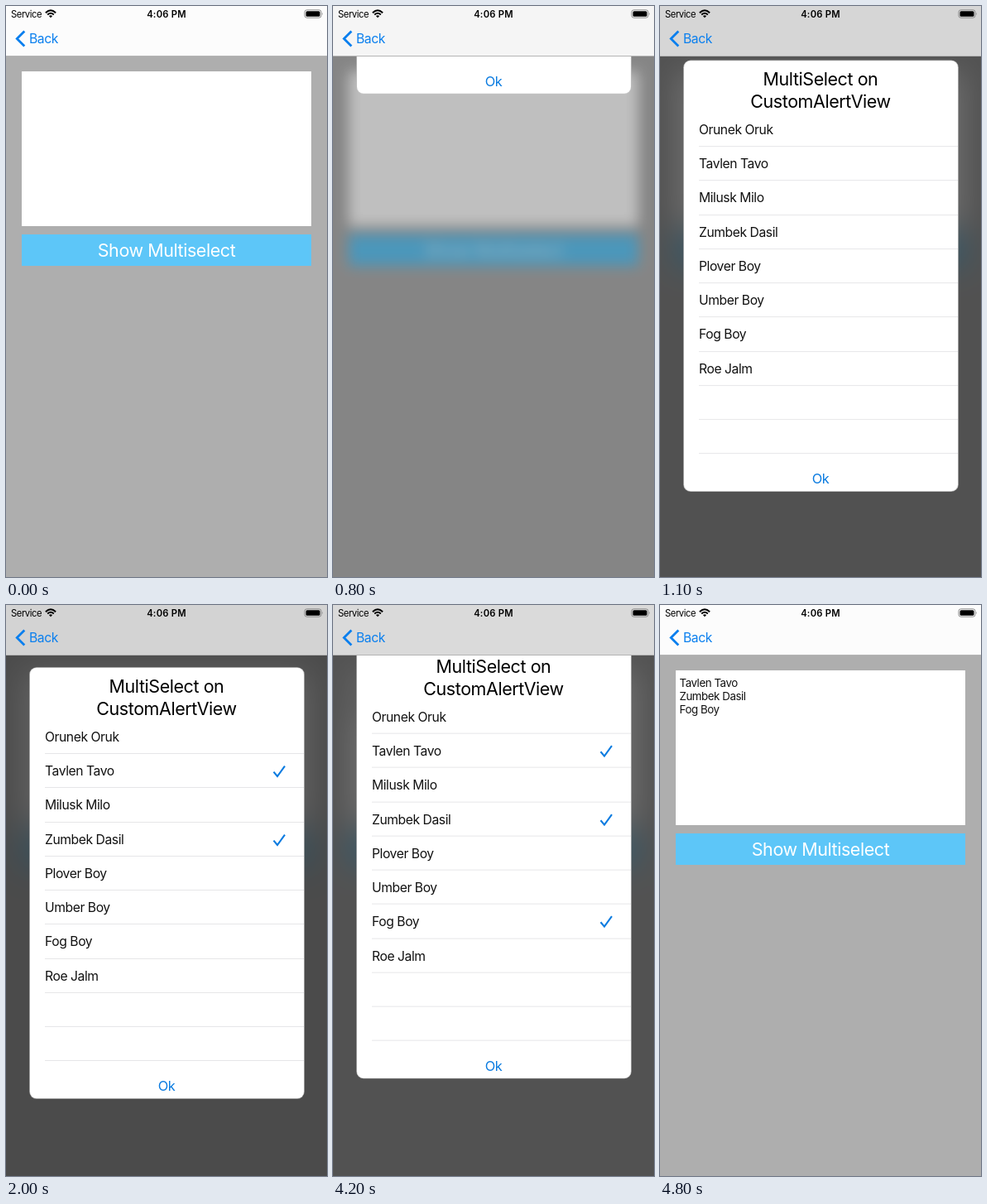
An HTML page for the animation above (4900 ms loop, 388 by 690 pixels).

```html
<!DOCTYPE html>
<html lang="en">
<head>
<meta charset="utf-8">
<style>
html, body { margin: 0; width: 100%; height: 100%; overflow: hidden; }
body { position: relative; background: #aeaeae; font: 15.7px/20px Inter, "Open Sans", sans-serif; letter-spacing: -.028em; color: #111; }
div, svg { position: absolute; white-space: nowrap; }
#stage { width: 388px; height: 690px; overflow: hidden; }
#page { inset: -80px; background: #aeaeae; }
#box { left: 99px; top: 159px; width: 350px; height: 187px; background: #fff; }
#picked { left: 4.5px; top: 7px; font-size: 13.3px; line-height: 16px; white-space: pre; }
#button { left: 99px; top: 356px; width: 350px; height: 38px; background: #5dc6f8; }
#label { width: 100%; text-align: center; font-size: 21.5px; line-height: 39px; color: #fff; }
#shade { inset: 0; background: #212121; }
#alert { left: 28.5px; top: 75.5px; width: 331px; height: 520.5px; border-radius: 8px; background: #fff; box-shadow: 0 0 0 .7px #c4c4c4; overflow: hidden; }
#title { width: 100%; top: 9.5px; text-align: center; font-size: 21.5px; line-height: 26.5px; color: #000; }
.row { left: 18.5px; right: 0; height: 41.25px; line-height: 41.25px; box-sizing: border-box; border-bottom: 1px solid #e6e6e8; }
.row svg { left: 275px; top: 13px; }
#ok { width: 100%; top: 495px; text-align: center; font-size: 16.4px; color: #0a7be0; }
#nav { width: 388px; height: 59.5px; border-bottom: .5px solid #b4b4b4; }
#network, #clock { font-size: 11.25px; line-height: 14px; top: 3px; color: #000; }
#network { left: 6px; }
#clock { width: 100%; text-align: center; font-weight: 600; letter-spacing: .02em; }
#back { left: 28px; top: 30px; color: #0a7fee; }
</style>
</head>
<body>
<div id="stage">
  <div id="page">
    <div id="box"><div id="picked"></div></div>
    <div id="button"><div id="label">Show Multiselect</div></div>
  </div>
  <div id="shade"></div>
  <div id="alert">
    <div id="title">MultiSelect on<br>CustomAlertView</div>
    <div id="ok">Ok</div>
  </div>
  <div id="nav">
    <div id="network">Service</div>
    <div id="clock">4:06 PM</div>
    <div id="back">Back</div>
    <svg width="388" height="60" fill="none">
      <g stroke="#000" stroke-width="2">
        <path d="M47.9 8.2Q54 2.4 60.1 8.2M50.2 10.5Q54 7 57.8 10.5"/>
        <path d="M54 14.2l-2.1-2.2q2.1-1.7 4.2 0z" fill="#000" stroke="none"/>
      </g>
      <rect x="361" y="4.8" width="20" height="9.4" rx="2.6" stroke="#8a8a8a"/>
      <rect x="362.5" y="6.3" width="17" height="6.4" rx="1.5" fill="#000"/>
      <path d="M382.2 8q1.4 1.5 0 3z" fill="#8a8a8a"/>
      <path d="M22.3 30.6L13.3 39.5l9 8.9" stroke="#0a7fee" stroke-width="2.8"/>
    </svg>
  </div>
</div>
<script>
const LOOP = 4900, STEP = 100, ROW = 41.25, TRAVEL = 690;
const names = ["Orunek Oruk", "Tavlen Tavo", "Milusk Milo", "Zumbek Dasil", "Plover Boy", "Umber Boy", "Fog Boy", "Roe Jalm"];
const checkedAt = { 1: 1400, 3: 2000, 6: 2500 };
const $ = id => document.getElementById(id);
const ramp = (t, from, to) => Math.min(1, Math.max(0, (t - from) / (to - from)));
const smooth = x => x * x * (3 - 2 * x);

const ticks = [];
for (let i = 0; i < 10; i++) {
  const row = document.createElement("div");
  row.className = "row";
  row.style.top = 63.4 + i * ROW + "px";
  row.textContent = names[i] || "";
  if (checkedAt[i]) {
    row.insertAdjacentHTML("beforeend", '<svg width="18" height="16" fill="none" stroke="#0a7be0" stroke-width="2.1"><path d="M1.5 8.6L6 14 15 1.6"/></svg>');
    ticks.push([row.lastChild, checkedAt[i]]);
  }
  $("alert").append(row);
}
const chosen = Object.keys(checkedAt).map(i => names[i]).join("\n");

function draw(t) {
  const shown = smooth(ramp(t, 614, 1137)) - smooth(ramp(t, 4141, 4664));
  const dim = ramp(t, 565, 1140) - ramp(t, 4155, 4730);
  const lift = TRAVEL * (1 - shown);
  const top = 75.5 - lift;

  $("alert").style.transform = `translateY(${-lift}px)`;
  $("page").style.filter = dim ? `blur(${20 * dim}px)` : "none";
  $("shade").style.opacity = .7 * dim;
  $("label").style.opacity = t < 400 ? 1 : .22 + .78 * ramp(t, 600, 900);
  $("picked").textContent = t < 4150 ? "" : chosen;

  // The bar is translucent: it darkens with the page and brightens over the alert.
  const cover = top + 520 > 0 ? ramp(60 - top, 0, 60) : 0;
  const tone = 252 - 41 * dim * (1 - .6 * cover);
  $("nav").style.background = `rgb(${tone}, ${tone}, ${tone})`;

  for (const [tick, at] of ticks) tick.style.visibility = t < at ? "hidden" : "visible";
}

let start;
function frame() {
  const now = performance.now();
  start ??= now;
  draw(Math.floor((now - start + 5) / STEP) * STEP % LOOP);
  requestAnimationFrame(frame);
}
frame();
</script>
</body>
</html>
```
